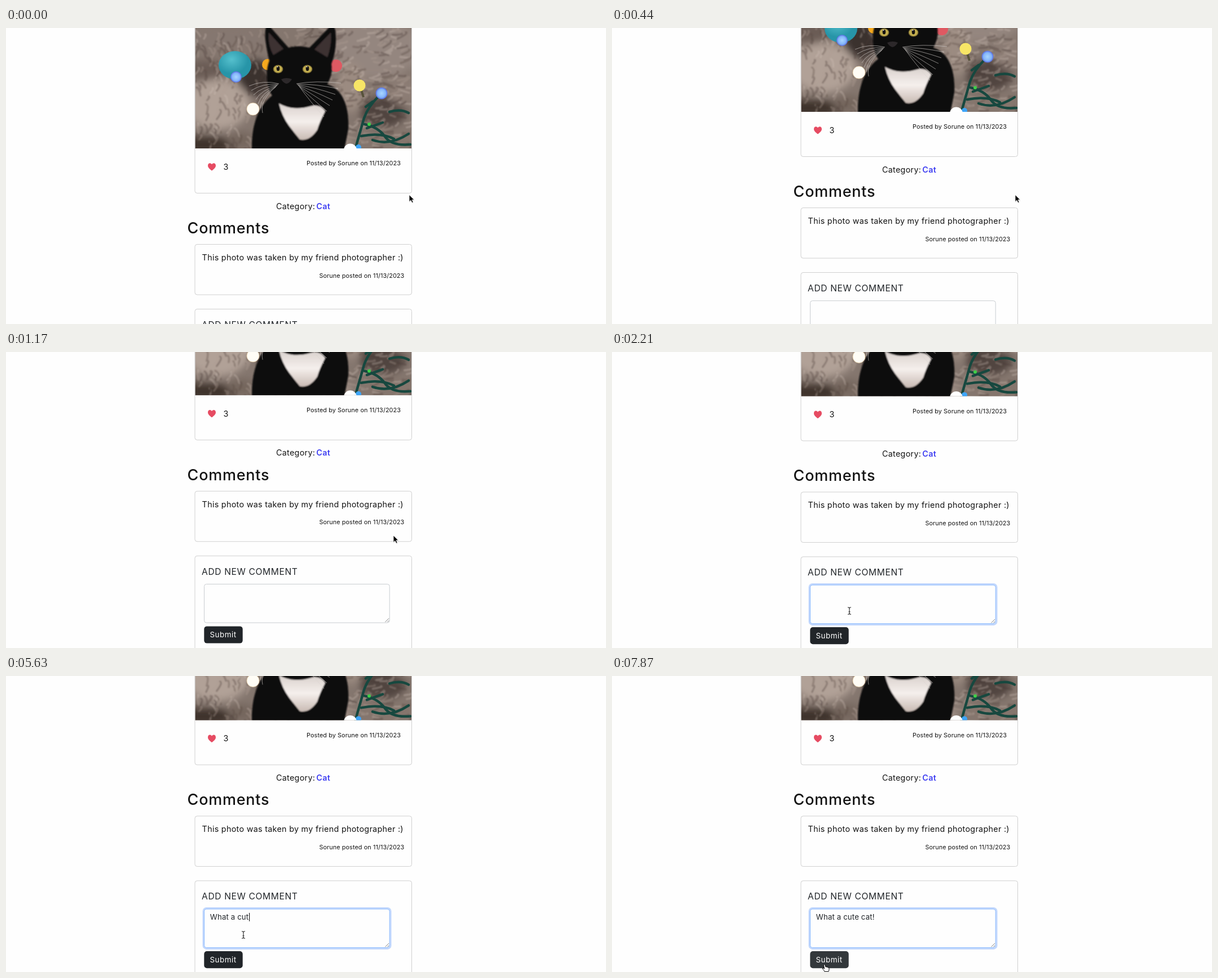
These frames come from a looping animation (1064 px wide and 526 px high, 8000 ms). An HTML page:

```html
<!DOCTYPE html>
<html lang="en">
<head>
<meta charset="utf-8">
<title>Photo comments</title>
<style>
  html, body { margin: 0; width: 100%; height: 100%; overflow: hidden; background: #fefefe; }
  svg { display: block; }
  text { font-family: Inter, sans-serif; font-size: 14.3px; letter-spacing: .31px; fill: #131313; white-space: pre; }
  .small { font-size: 10.8px; letter-spacing: .11px; text-anchor: end; }
  .title { font-size: 27px; font-weight: 500; letter-spacing: .75px; }
  .label { font-size: 15.6px; letter-spacing: .62px; fill: #212529; }
  .typed { font-size: 13.2px; letter-spacing: .15px; fill: #212529; }
  .button { font-size: 13.4px; letter-spacing: .5px; fill: #fff; }
  .link { font-weight: 600; fill: #3f3ff2; }
  .card { fill: none; stroke: #d0d0d0; }
  .wire { fill: none; stroke: #17483f; stroke-width: 4.5; stroke-linecap: round; }
  .whisker { fill: none; stroke: #d9d3d0; stroke-width: .8; opacity: .75; }
</style>
</head>
<body>
<svg width="1064" height="526" viewBox="0 0 1064 526">
  <defs>
    <clipPath id="photoBox"><rect x="335.5" y="-10" width="383.5" height="224"/></clipPath>
    <filter id="soft" x="-30%" y="-30%" width="160%" height="160%"><feGaussianBlur stdDeviation="7"/></filter>
    <filter id="edge"><feGaussianBlur stdDeviation="1"/></filter>
    <radialGradient id="ball" cx=".4" cy=".3">
      <stop offset="0" stop-color="#55c0cd"/><stop offset="1" stop-color="#2795a8"/>
    </radialGradient>
    <radialGradient id="blue">
      <stop offset="0" stop-color="#a9d6ff"/><stop offset=".7" stop-color="#82b4fa"/><stop offset="1" stop-color="#5669e0"/>
    </radialGradient>
    <linearGradient id="bib" x2="0" y2="1">
      <stop offset="0" stop-color="#d9d1cd"/><stop offset=".5" stop-color="#f5efec"/><stop offset="1" stop-color="#c9bbb4"/>
    </linearGradient>
  </defs>

  <g id="page">
    <g clip-path="url(#photoBox)">
      <rect x="335" y="-10" width="385" height="225" fill="#84766e"/>
      <g filter="url(#soft)">
        <ellipse cx="390" cy="20" rx="80" ry="26" fill="#85776f"/>
        <ellipse cx="655" cy="35" rx="80" ry="55" fill="#94867f"/>
        <ellipse cx="352" cy="74" rx="36" ry="17" fill="#6b5c55"/>
        <ellipse cx="442" cy="88" rx="30" ry="32" fill="#3b302e"/>
        <ellipse cx="375" cy="136" rx="58" ry="44" fill="#b1a197"/>
        <ellipse cx="612" cy="105" rx="24" ry="45" fill="#9b8b81"/>
        <ellipse cx="668" cy="150" rx="40" ry="28" fill="#51443f"/>
        <ellipse cx="703" cy="112" rx="24" ry="26" fill="#8c7d74"/>
        <ellipse cx="352" cy="208" rx="60" ry="15" fill="#3d302c"/>
        <ellipse cx="418" cy="200" rx="26" ry="15" fill="#75665d"/>
        <ellipse cx="590" cy="204" rx="25" ry="12" fill="#a19187"/>
        <ellipse cx="680" cy="200" rx="50" ry="18" fill="#85766d"/>
      </g>
      <g id="fur" fill="none" stroke-width="3.5" stroke-linecap="round" opacity=".32" filter="url(#edge)"/>
      <ellipse cx="406" cy="66" rx="29" ry="25" fill="url(#ball)"/>
      <circle cx="464" cy="65" r="10" fill="#f6a91e"/>
      <circle cx="585" cy="67" r="11" fill="#df5962"/>

      <g filter="url(#edge)">
        <path d="M436 216 C435 175 446 140 472 120 C461 105 460 75 467 58 C460 30 458 10 461 -2 Q464 -8 472 2 L501 35 Q520 30 538 35 L572 0 Q581 -8 584 4 Q588 35 577 64 C579 80 575 90 570 100 C600 110 609 145 607 180 L600 216Z" fill="#100e10"/>
        <path d="M466 8 Q464 30 474 48 L492 37Z M576 8 Q578 30 570 52 L547 38Z" fill="#3c3233"/>
        <path d="M484 134 Q508 148 540 139 Q557 134 566 148 Q556 167 552 181 Q538 202 521 198 Q512 187 502 174 Q489 156 484 134Z" fill="url(#bib)"/>
      </g>
      <g id="eyes"/>
      <path d="M488 91 Q498 87 507 91 Q503 98 497 99 Q491 97 488 91Z" fill="#2c282a"/>
      <g id="whiskers" class="whisker"/>

      <path class="wire" d="M660 122 Q642 140 635 160 Q627 188 619 216 M650 131 L638 140 M636 171 Q660 176 672 193 T717 207"/>
      <path class="wire" d="M630 192 Q665 185 688 197 M680 149 Q700 143 714 151 M640 178 L668 168 M650 199 Q681 210 714 188" stroke-width="3"/>
      <path d="M630 110 L634 123" stroke="#57523b" stroke-width="4"/>
      <circle cx="408" cy="87" r="10" fill="url(#blue)"/>
      <circle cx="627" cy="102" r="10.5" fill="#f7e566"/>
      <circle cx="666" cy="116" r="10.5" fill="url(#blue)"/>
      <circle cx="644" cy="171" r="3" fill="#40cf48"/>
      <circle cx="625" cy="212" r="5" fill="#3da5fa"/>
      <circle cx="438" cy="144" r="11" fill="#fffdf6" stroke="#e7ca9d" stroke-width=".7"/>
      <circle cx="610.5" cy="217" r="11.5" fill="#fff"/>
    </g>

    <path class="card" d="M335 -10 V289.5 Q335 293.5 339 293.5 H715.5 Q719.5 293.5 719.5 289.5 V-10"/>
    <path d="M365 253.5 C361 250.5 358 248 358 244.5 C358 239.5 363.2 239 365 242.3 C366.8 239 372 239.5 372 244.5 C372 248 369 250.5 365 253.5Z" fill="#e64b62"/>
    <text x="385.6" y="252">3</text>
    <text class="small" x="700" y="244.3">Posted by Sorune on 11/13/2023</text>
    <text x="479" y="321.6">Category:</text>
    <text class="link" x="550.3" y="321.6">Cat</text>
    <text class="title" x="321.6" y="364.9">Comments</text>

    <rect class="card" x="335" y="384.5" width="384.5" height="89.5" rx="4"/>
    <text x="347.6" y="413">This photo was taken by my friend photographer :)</text>
    <text class="small" x="706.3" y="443.6">Sorune posted on 11/13/2023</text>

    <rect class="card" x="335" y="499.5" width="384.5" height="240" rx="4"/>
    <text class="label" x="347" y="533">ADD NEW COMMENT</text>
    <rect id="ring" x="350" y="548" width="332" height="72" rx="5.5" fill="none" stroke="#c3d8fd" stroke-width="3"/>
    <rect id="field" x="351.5" y="549.7" width="328.7" height="68.6" rx="4" fill="#fefefe"/>
    <path d="M672.5 617 L679 610.5 M676.5 617 L679 614.5" stroke="#777" stroke-width=".9"/>
    <text id="typed" class="typed" x="361.8" y="568.5"></text>
    <rect id="caret" y="556.5" width="1.1" height="15" fill="#111"/>
    <rect id="button" x="351.3" y="624.6" width="68.4" height="30.2" rx="5"/>
    <text class="button" x="361.5" y="644.3">Submit</text>
  </g>

  <g id="arrow">
    <path d="M0 0 V12.2 L2.9 9.6 L5 14 L7.1 13.1 L5.1 8.7 H8.8Z" fill="#888" opacity=".3" transform="translate(.4 1.2)"/>
    <path d="M0 0 V12.2 L2.9 9.6 L5 14 L7.1 13.1 L5.1 8.7 H8.8Z" fill="#000" stroke="#fff" stroke-width=".8"/>
  </g>
  <path id="beam" d="M-3 -6.2 Q0 -6.2 0 -4.5 Q0 -6.2 3 -6.2 M0 -4.5 V4.5 M-3 6.2 Q0 6.2 0 4.5 Q0 6.2 3 6.2 M-1.5 1.8 H1.5" fill="none" stroke="#222" stroke-width="1.1"/>
  <path id="hand" d="M-2.6 -5.2 Q-1.3 -6.8 -.3 -5.2 L1 -1.4 Q2.4 -2.5 3.2 -1 Q4.8 -1.8 5.3 -.2 Q7 -.6 7 1.2 Q7.4 4.6 5.6 7 H-.8 Q-2.1 4.1 -4.8 1.6 Q-4.8 -.3 -2.6 .7 L-1.5 1.8Z" fill="#fff" stroke="#000" stroke-width="1"/>
</svg>
<script>
const LOOP = 8000;
const MESSAGE = "What a cute cat!";
const el = id => document.getElementById(id);
const show = (id, on) => el(id).setAttribute("visibility", on ? "visible" : "hidden");

// Each row is [start time, value...]; a value holds until the next row.
const scroll = [[0, 0], [150, -5], [290, -21.6], [440, -65], [590, -106.8], [730, -130],
  [880, -137.2], [1320, -135.6]];
const letters = [[0, 0], [4310, 1], [4460, 2], [4750, 3], [4900, 4], [5040, 5], [5190, 6],
  [5340, 7], [5480, 9], [5630, 10], [5930, 11], [6080, 12], [6380, 13], [6530, 14], [6680, 15], [6980, 16]];
const caretOn = [[0, 0], [2360, 1], [2810, 0], [3260, 1], [3710, 0], [4310, 1], [7420, 0]];
const pointer = [[0, "arrow", 715, 296.5], [1170, "arrow", 687, 326], [1320, "arrow", 610, 373],
  [1470, "beam", 505, 437], [1620, "beam", 440, 457], [2060, "beam", 421, 460],
  [7420, "beam", 402, 476], [7570, "none", 0, 0], [7870, "hand", 378, 518.5]];
const FOCUS = 2210, HOVER = 7570;

const at = (table, t) => table.findLast(row => row[0] <= t).slice(1);

function drawFur() {
  let seed = 11;
  const rnd = () => (seed = seed * 16807 % 2147483647) / 2147483647;
  el("fur").innerHTML = ["#d0c1b7", "#56473f", "#b09f94", "#463934"].map(color => {
    let d = "";
    for (let i = 0; i < 150; i++) {
      const x = 335 + rnd() * 385, y = rnd() * 216;
      const a = (x < 520 ? .8 : 2.2) + rnd() * 1.3, len = 7 + rnd() * 12;
      d += `M${x} ${y}q${len * .3} ${len * .1} ${Math.cos(a) * len} ${Math.sin(a) * len}`;
    }
    return `<path d="${d}" stroke="${color}"/>`;
  }).join("");
}

function drawFace() {
  el("eyes").innerHTML = [482.5, 534.5].map(x =>
    `<ellipse cx="${x}" cy="73" rx="9" ry="7.5" fill="#756630"/>
     <ellipse cx="${x}" cy="73" rx="7.5" ry="6.2" fill="#c3ae4f"/>
     <ellipse cx="${x}" cy="72" rx="2.8" ry="4.2" fill="#151210"/>
     <circle cx="${x - 1}" cy="69" r="1.1" fill="#ddd"/>`).join("");
  let d = "";
  for (let i = 0; i < 7; i++) {
    d += `M${484 - i} ${99 + i}Q${456 - i} ${92 + i * 6} ${431 + i * 4} ${103 + i * 8}`;
    d += `M${515 + i} ${99 + i}Q${550 - i * 2} ${93 + i * 6} ${594 - i * 5} ${98 + i * 10}`;
  }
  el("whiskers").innerHTML = `<path d="${d}"/>`;
}

function frame() {
  const t = performance.now() % LOOP;
  el("page").setAttribute("transform", `translate(0 ${at(scroll, t)[0]})`);

  const focused = t >= FOCUS;
  show("ring", focused);
  el("field").setAttribute("stroke", focused ? "#86b7fe" : "#c9cdd1");
  el("button").setAttribute("fill", t >= HOVER ? "#33383b" : "#212529");

  el("typed").textContent = MESSAGE.slice(0, at(letters, t)[0]);
  el("caret").setAttribute("x", 362.6 + el("typed").getComputedTextLength());
  show("caret", at(caretOn, t)[0]);

  const [kind, x, y] = at(pointer, t);
  for (const id of ["arrow", "beam", "hand"]) {
    show(id, id === kind);
    el(id).setAttribute("transform", `translate(${x} ${y})`);
  }
  requestAnimationFrame(frame);
}

drawFur();
drawFace();
frame();
</script>
</body>
</html>
```
